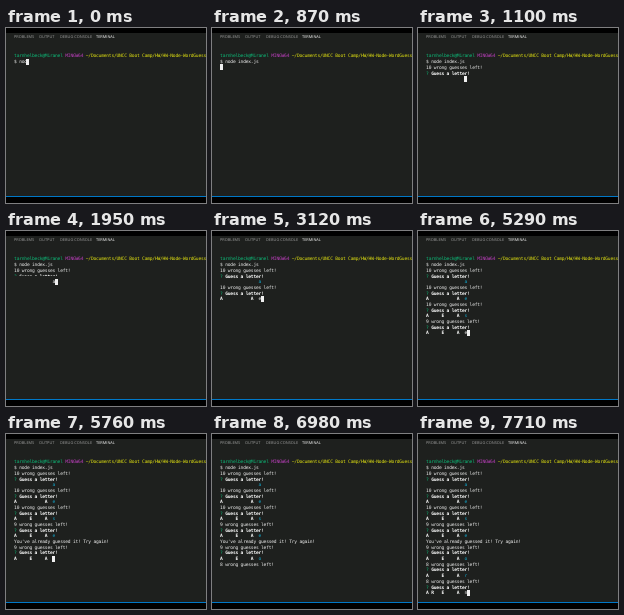
These frames come from a looping animation (200x175 px, 8 s). An HTML page with a canvas:

```html
<!DOCTYPE html>
<html lang="en">
<head>
<meta charset="utf-8">
<title>Word guess terminal</title>
<style>
html, body { margin: 0; width: 200px; height: 175px; overflow: hidden; background: #1e201e; }
canvas { display: block; width: 200px; height: 175px; }
</style>
</head>
<body>
<canvas id="stage" width="200" height="175"></canvas>
<script>
const ctx = document.getElementById('stage').getContext('2d');
ctx.textRendering = 'geometricPrecision';
const LOOP = 8000, SCALE = 0.3556;
const LEFT = 8.1, TOP = 25.45, COL = 2.56, ROW = 5.685;
const MONO = '"DejaVu Sans Mono", "Liberation Mono", monospace';
const SANS = '"Open Sans", "Noto Sans", sans-serif';
const INK = '#f0f0f0', WHITE = '#ffffff', GREEN = '#0dbc79';
const MAGENTA = '#bc3fbc', YELLOW = '#e5e510', CYAN = '#11a8cd';
const ANSWER_COL = 15;

// show: full block, tear: brief redraw before the next block, typed: key press
const rounds = [
  { row: 2, show: 1100, typed: 1480, tear: 1950, done: 2030, left: 10, word: '', key: 'a' },
  { row: 5, show: 2030, typed: 3120, done: 3500, left: 10, word: 'A           A', key: 'e' },
  { row: 8, show: 3500, typed: 4220, tear: 4450, done: 4530, left: 10, word: 'A     E     A', key: 's' },
  { row: 11, show: 4530, typed: 5290, tear: 5690, done: 5760, left: 9, word: 'A     E     A', key: 'e' },
  { row: 15, show: 5760, typed: 6750, done: 6980, left: 9, word: 'A     E     A', key: 'o' },
  { row: 18, show: 7060, typed: 7460, done: 7460, left: 8, word: 'A     E     A', key: 'r' },
  { row: 21, show: 7460, typed: 7710, done: LOOP, left: 8, word: 'A R   E     A', key: 'n' }
];
const typing = [[0, 'nod'], [100, 'node'], [330, 'node '], [480, 'node i'], [560, 'node in'], [870, 'node index.js']];

const rowTop = row => TOP + row * ROW;

function label(text, x, y, font, color) {
  ctx.save();
  ctx.translate(x, y);
  ctx.scale(SCALE, SCALE);
  ctx.font = font;
  ctx.fillStyle = color;
  ctx.fillText(text, 0, 0);
  ctx.restore();
}

function write(text, row, col, color, weight = 'normal') {
  const base = Math.round(rowTop(row) + 4);
  [...text].forEach((ch, i) => {
    if (ch !== ' ') label(ch, LEFT + (col + i) * COL, base, `${weight} 13px ${MONO}`, color);
  });
}

function cursor(row, col) {
  ctx.fillStyle = INK;
  ctx.fillRect(Math.floor(LEFT + col * COL), Math.floor(rowTop(row)), 3, 6);
}

function bar(y, h, color) {
  ctx.fillStyle = color;
  ctx.fillRect(0, y, 200, h);
}

function drawPanel() {
  bar(0, 175, '#1e201e');
  bar(0, 5, '#000000');
  bar(168, 1, '#0078c8');
  bar(169, 6, '#000000');
  const tabs = [['PROBLEMS', 8], ['OUTPUT', 33], ['DEBUG CONSOLE', 54], ['TERMINAL', 90]];
  for (const [name, x] of tabs) {
    label(name, x, 10.2, `11px ${SANS}`, name === 'TERMINAL' ? '#ffffff' : '#a0a0a0');
  }
}

function drawPrompt(t) {
  write('tarnhelbeck@Miranel', 0, 0, GREEN);
  write('MINGW64', 0, 20, MAGENTA);
  write('~/Documents/UNCC Boot Camp/HW/HW-Node-WordGuess', 0, 28, YELLOW);
  const line = typing.filter(step => t >= step[0]).pop()[1];
  write('$ ' + line, 1, 0, INK);
  if (t < 870) cursor(1, 2 + line.length);
  else if (t < 1020) cursor(2, 0);
}

function drawQuestion(row) {
  write('?', row, 0, GREEN);
  write('Guess a letter!', row, 2, WHITE, 'bold');
}

function drawRound(r, t) {
  if (t < r.show) return;
  write(`${r.left} wrong guesses left!`, r.row, 0, INK);
  const ask = r.row + 1, reply = r.row + 2;
  const torn = r.tear && t >= r.tear && t < r.done;
  ctx.save();
  if (torn) {
    ctx.beginPath();
    ctx.rect(0, 0, 200, Math.round(rowTop(ask)) + 2);
    ctx.clip();
  }
  drawQuestion(ask);
  ctx.restore();
  if (!torn) write(r.word, reply, 0, WHITE, 'bold');
  const typed = t >= r.typed, done = t >= r.done;
  if (typed) write(r.key, reply, ANSWER_COL, done ? CYAN : INK);
  if (!done) cursor(reply, ANSWER_COL + (typed ? 1 : 0));
}

function draw(t) {
  drawPanel();
  drawPrompt(t);
  if (t >= 1020 && t < 1100) write('10 wrong guesses left!', 2, 0, INK);
  for (const r of rounds) drawRound(r, t);
  if (t >= 5760) write("You've already guessed it! Try again!", 14, 0, INK);
  if (t >= 6980 && t < 7060) write('8 wrong guesses left!', 18, 0, INK);
}

const start = performance.now();
function tick() {
  draw((performance.now() - start) % LOOP);
  requestAnimationFrame(tick);
}
draw(0);
requestAnimationFrame(tick);
</script>
</body>
</html>
```
